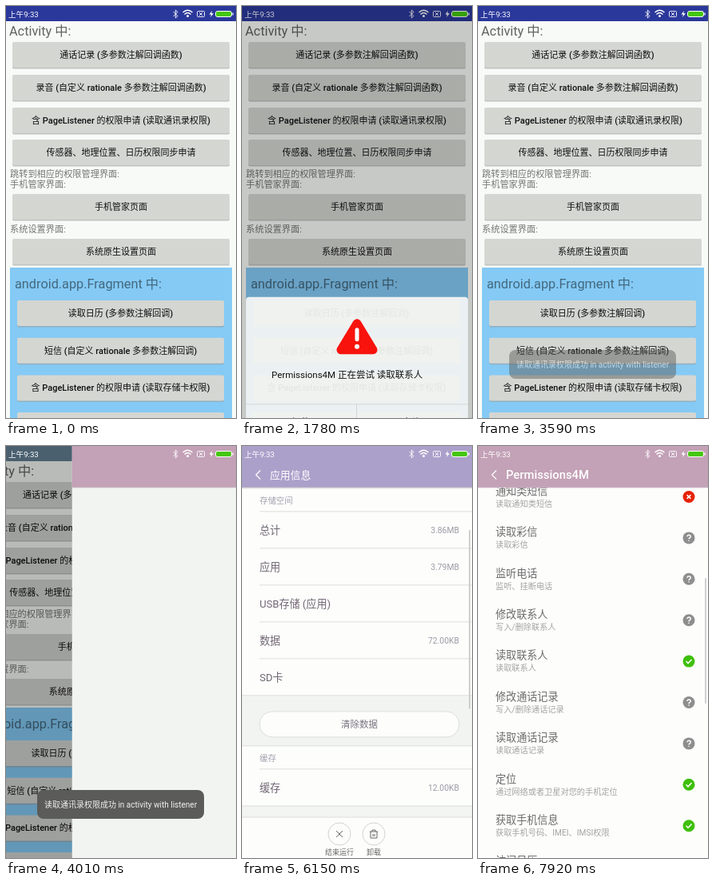
An HTML page that plays this animation: 288 by 515 pixels, repeating every 8 s.

```html
<!DOCTYPE html>
<html lang="zh-CN">
<head>
<meta charset="utf-8">
<title>权限申请演示</title>
<style>
  html, body { margin: 0; width: 100%; height: 100%; overflow: hidden; background: #f8faf7; }
  svg { display: block; width: 100vw; height: 100vh; }
  text { font-family: Roboto, "Noto Sans CJK SC", "Noto Sans CJK", sans-serif; }
</style>
</head>
<body>
<svg id="stage" viewBox="0 0 288 515"></svg>
<script>
const W = 288, H = 515, LOOP = 8000, HEADER = 52, BAR = 464;
const PINK = '#c3a1b6', LAVENDER = '#aba0ca', GRAY = '#f2f4f2', WHITE = '#fdfefc', LINE = '#dcdedc';
const stage = document.getElementById('stage');

// Moments at which the picture changes; it is held in between.
const STEPS = [0, 1240, 1360, 1510, 1630, 1780, 1930, 2080,
  2510, 2630, 2750, 2870, 3020, 3140, 3440,
  3590, 3720, 3860, 4010, 4160, 4280, 4400,
  4710, 4860, 5010, 5160, 5310, 5430, 5580, 5730,
  5880, 6030, 6150, 6300, 6420, 6570, 6690, 6840,
  6960, 7080, 7230, 7380, 7530, 7680, 7920];

const clamp = v => Math.max(0, Math.min(1, v));
const ramp = (t, start, length) => clamp((t - start) / length);
const easeOut = p => 1 - Math.pow(1 - p, 2.35);
const smooth = p => p * p * (3 - 2 * p);

function add(parent, tag, attrs) {
  const el = document.createElementNS('http://www.w3.org/2000/svg', tag);
  for (const key in attrs) el.setAttribute(key, attrs[key]);
  return parent.appendChild(el);
}
const group = parent => add(parent, 'g', {});
const rect = (parent, x, y, width, height, fill, more) =>
  add(parent, 'rect', { x, y, width, height, fill, ...more });
const path = (parent, d, stroke, width = 1, more) =>
  add(parent, 'path', { d, stroke, 'stroke-width': width, fill: 'none', ...more });
const circle = (parent, cx, cy, r, fill, more) => add(parent, 'circle', { cx, cy, r, fill, ...more });

// Places text by its vertical middle.
function label(parent, x, middle, size, fill, content, more) {
  const el = add(parent, 'text', { x, y: middle + size * 0.37, 'font-size': size, fill, ...more });
  el.textContent = content;
  return el;
}
const MIDDLE = { 'text-anchor': 'middle' }, END = { 'text-anchor': 'end' }, BOLD = { 'font-weight': 500 };
const move = (el, x, y) => el.setAttribute('transform', `translate(${x} ${y})`);
const fade = (el, opacity) => el.setAttribute('opacity', opacity);

function button(parent, x, y, width, content) {
  rect(parent, x, y + 1.5, width, 32, '#9b9e9b', { rx: 2, opacity: 0.6 });
  const face = rect(parent, x, y, width, 32, '#d4d6d2', { rx: 2 });
  label(parent, x + width / 2, y + 16, 11, '#111', content, { ...MIDDLE, ...BOLD });
  return face;
}

function header(parent, fill) {
  const bar = rect(parent, 0, 0, W, HEADER, fill);
  path(parent, `M0 ${HEADER}H${W}`, '#cfc4cc', 0.8);
  return bar;
}
function headerTitle(parent, content, size) {
  const g = group(parent);
  path(g, 'M23 30.5L17.5 36L23 41.5', '#fff', 1.2);
  label(g, 35, 36, size, '#fff', content, BOLD);
  return g;
}

// Main screen
const main = group(stage);
rect(main, 0, 0, W, H, '#f8faf7');
const mainStatus = rect(main, 0, 0, W, 19, '#2b389b');
label(main, 4, 31, 16.3, '#60635f', 'Activity 中:');
const mainButtons = [
  [45, '通话记录 (多参数注解回调函数)'],
  [86, '录音 (自定义 rationale 多参数注解回调函数)'],
  [127, '含 PageListener 的权限申请 (读取通讯录权限)'],
  [167, '传感器、地理位置、日历权限同步申请'],
  [235, '手机管家页面'],
  [291, '系统原生设置页面']
].map(([y, content]) => button(main, 8, y, 272, content));
[[210, '跳转到相应的权限管理界面:'], [223, '手机管家界面:'], [279, '系统设置界面:']]
  .forEach(([y, content]) => label(main, 5, y, 11.2, '#747672', content));
rect(main, 5, 327, 278, 188, '#84caf5');
label(main, 11, 347, 16.3, '#44687f', 'android.app.Fragment 中:');
['读取日历 (多参数注解回调)', '短信 (自定义 rationale 多参数注解回调)',
  '含 PageListener 的权限申请 (读取存储卡权限)', '传感器、日历权限同步申请']
  .forEach((content, i) => button(main, 14, 368 + i * 46.7, 259, content));
const mainShade = rect(main, 0, 0, W + 70, H, '#000');

// App details screen
const details = group(stage);
rect(details, 0, 0, W, H, GRAY);
const detailsBody = group(details);
const scroller = group(detailsBody);

function panel(top, bottom) {
  rect(scroller, 0, top, W, bottom - top, WHITE);
  path(scroller, `M0 ${top}H${W}M0 ${bottom}H${W}`, LINE);
}
function section(top, name, rows) {
  panel(top, top + 29 + rows * 46);
  label(scroller, 22, top + 15, 10.4, '#a49fae', name);
  for (let i = 0; i < rows; i++) path(scroller, `M22 ${top + 29 + i * 46}H${W}`, LINE);
}
function pill(top, content) {
  rect(scroller, 22, top, 250, 32, WHITE, { rx: 16, stroke: LINE });
  label(scroller, 147, top + 16, 11.5, '#77707d', content, MIDDLE);
}
const rowName = (middle, content, fill = '#706673') => label(scroller, 22, middle, 13.1, fill, content);
const rowNote = (middle, content) => label(scroller, 22, middle, 10.2, '#a9a9ac', content);
const rowValue = middle => label(scroller, 272, middle, 10.4, '#9c99a5', '', END);

rect(scroller, 0, HEADER, W, 48, WHITE);
rect(scroller, 23, 60, 25, 25, '#a070dc', { rx: 4 });
label(scroller, 58, 66, 14, '#706673', 'Permissions4M');
label(scroller, 58, 83, 10.2, '#a9a9ac', '版本 1.0');
panel(101, 146);
rowName(124, '自定义通知');
label(scroller, 255, 124, 10.4, '#8d8a94', '角标', END);
path(scroller, 'M266 119L271 124L266 129', '#b5b5b8');
section(153, '存储空间', 5);
['总计', '应用', 'USB存储 (应用)', '数据', 'SD卡'].forEach((name, i) => rowName(205 + i * 46, name));
const sizes = [[205, '3.86MB'], [251, '3.79MB'], [343, '72.00KB']]
  .map(([y, size]) => ({ el: rowValue(y), size }));
pill(432, '清除数据');
section(475, '缓存', 1);
rowName(527, '缓存');
rowValue(527).textContent = '12.00KB';
pill(570, '清除缓存');
section(612, '默认打开', 1);
rowName(658, '清除默认操作', '#b4b4b6');
rowNote(674, '没有默认操作。');
section(694, '权限', 2);
rowName(739, '查看权限详情');
rowNote(755, '全部权限: 安全4, 隐私12');
rowName(785, '权限管理');
rowNote(801, '自启动, 安全权限, 隐私权限');
const detailsThumb = rect(detailsBody, 284, HEADER, 2, 224, '#cfd0cf', { rx: 1 });

const actionBar = group(detailsBody);
rect(actionBar, 0, BAR, W, H - BAR, WHITE);
path(actionBar, `M0 ${BAR}H${W}`, LINE);
const actions = [
  ['结束运行', 'M-4 -4L4 4M4 -4L-4 4'],
  ['卸载', 'M-5 -3H5M-2 -3V-5H2V-3M-4 -3V5H4V-3M-1 0V3M1 0V3']
].map(([name, icon], i) => {
  const g = group(actionBar), art = group(g);
  move(art, 122 + i * 43, 485);
  circle(art, 0, 0, 14, WHITE, { stroke: '#d2d3d2' });
  path(art, icon, '#666');
  label(g, 122 + i * 43, 508, 9, '#666', name, MIDDLE);
  return g;
});
const detailsHeader = header(details, PINK);
const detailsTitle = headerTitle(details, '应用信息', 12.8);
const detailsShade = rect(details, 0, 0, W + 70, H, '#000');

// Permission list screen
const perms = group(stage);
rect(perms, 0, 0, W, H, GRAY);
const permsBody = group(perms);
rect(permsBody, 0, HEADER, W, H - HEADER, WHITE);
const list = group(permsBody);
label(list, 22, 85, 13, '#6b6b6b', '信任该应用');
label(list, 22, 101, 10.2, '#a3a3a3', '不再提示所有权限申请');
rect(list, 242, 83, 30, 16, '#e1e3e1', { rx: 8 });
circle(list, 250, 91, 7, '#fff');
rect(list, 0, 126, W, 30, GRAY);
label(list, 22, 142, 10.4, '#a3a3a3', '安全和隐私');

const MARKS = {
  ask: ['#8e8e8e', 'M-2 -1.6C-2 -4.4 2.4 -4.2 2.2 -1.5C2 0 0 0 0 1.7M0 3V4.2'],
  yes: ['#3fbf0b', 'M-3.4 0L-1 2.5L3.5 -2.2'],
  no: ['#e62306', 'M-2.4 -2.4L2.4 2.4M2.4 -2.4L-2.4 2.4']
};
[['发送短信', '发送短信', 'ask'], ['发送彩信', '发送彩信', 'ask'],
  ['拨打电话', '直接拨打电话', 'ask'], ['读取短信', '读取短信', 'ask'],
  ['通知类短信', '读取通知类短信', 'no'], ['读取彩信', '读取彩信', 'ask'],
  ['监听电话', '监听、挂断电话', 'ask'], ['修改联系人', '写入/删除联系人', 'ask'],
  ['读取联系人', '读取联系人', 'yes'], ['修改通话记录', '写入/删除通话记录', 'ask'],
  ['读取通话记录', '读取通话记录', 'ask'], ['定位', '通过网络或者卫星对您的手机定位', 'yes'],
  ['获取手机信息', '获取手机号码、IMEI、IMSI权限', 'yes'], ['访问日历', '读取日历', 'ask']
].forEach(([name, note, mark], i) => {
  const y = 183.4 + i * 51.4, [fill, icon] = MARKS[mark], badge = group(list);
  label(list, 22, y, 13.1, '#6b6b6b', name);
  label(list, 22, y + 16, 10.2, '#a3a3a3', note);
  move(badge, 264, y + 7.5);
  circle(badge, 0, 0, 7.5, fill);
  path(badge, icon, '#fff', 1.5);
});
const permsThumb = rect(permsBody, 284, HEADER, 2, 157, '#cfd0cf', { rx: 1 });
header(perms, PINK);
const waitTitle = headerTitle(perms, '安全中心', 12.8);
const permsTitle = headerTitle(perms, 'Permissions4M', 14.8);

// Status icons
const status = group(stage);
label(status, 3, 10, 9.6, '#fff', '上午9:33');
path(status, 'M209.5 7L215 12.5L212.3 15V5L215 7.5L209.5 13', '#fff', 0.9);
path(status, 'M221.5 8Q227.5 2.5 233.5 8M223.5 10.5Q227.5 6.5 231.5 10.5', '#fff', 1.3);
circle(status, 227.5, 12.5, 1.5, '#fff');
rect(status, 239.5, 6.5, 9, 7, 'none', { stroke: '#fff', 'stroke-width': 0.9, rx: 1 });
path(status, 'M242 8L246 12M246 8L242 12', '#fff', 0.9);
add(status, 'path', { d: 'M258 6L254.5 10.5H257L256 14L260 9.3H257.3Z', fill: '#fff' });
rect(status, 262.5, 6.5, 20, 7, '#45c60c', { rx: 2.5, stroke: '#fff' });
rect(status, 283.5, 8.5, 1.2, 3, '#fff');

// Permission dialog
const dialogShade = rect(stage, 0, 0, W, H, '#000');
const dialog = group(stage);
rect(dialog, 5, 0, 278, 190, '#f6f8f6', { rx: 4, opacity: 0.93 });
const allowPress = rect(dialog, 143, 134, 140, 46, '#d8dad8');
path(dialog, 'M144 33L164 66H124Z', '#f8130d', 11, { fill: '#f8130d', 'stroke-linejoin': 'round' });
path(dialog, 'M144 41V53', '#fff', 5, { 'stroke-linecap': 'round' });
circle(dialog, 144, 62, 3, '#fff');
label(dialog, 37, 97, 11.5, '#111', 'Permissions4M 正在尝试 读取联系人');
path(dialog, 'M5 134H283M143.5 134V180', '#d3d5d3');
label(dialog, 74, 157, 12, '#444', '拒绝', MIDDLE);
label(dialog, 213, 157, 12, '#444', '允许', MIDDLE);

// Toast
const toast = group(stage);
rect(toast, 39, 430, 209, 36, '#5b5b59', { rx: 8 });
label(toast, 143.5, 448, 10, '#f1f1f0', '读取通讯录权限成功 in activity with listener', MIDDLE);

const SHEET = 180, SHIFT = 65, SHADE = 0.36;

function slide(page, under, shade, p) {
  move(page, W * (1 - p), 0);
  move(under, -SHIFT * p, 0);
  fade(shade, SHADE * p);
}

function render(t) {
  const inMain = t >= 1240 && t < 1630;
  mainButtons[2].setAttribute('fill', inMain ? '#bfc1be' : '#d4d6d2');

  const rise = easeOut(ramp(t, 1596, 340)) - easeOut(ramp(t, 2800, 290));
  move(dialog, 0, H - SHEET * rise);
  fade(dialog, rise > 0.001 ? 1 : 0);
  fade(dialogShade, SHADE * (ramp(t, 1596, 340) - ramp(t, 2830, 310)));
  fade(allowPress, t >= 2510 && t < 2870 ? 0.9 : 0);
  fade(toast, ramp(t, 3350, 500) - ramp(t, 5040, 320));

  const first = easeOut(ramp(t, 3870, 340));
  const second = easeOut(ramp(t, 6900, 340));
  mainStatus.setAttribute('fill', first > 0 ? '#638095' : '#2b389b');
  slide(details, main, mainShade, first);
  slide(perms, details, detailsShade, second);
  if (second === 0) move(details, W * (1 - first), 0);

  const shown = ramp(t, 4600, 400);
  fade(detailsBody, shown);
  fade(detailsTitle, shown);
  detailsHeader.setAttribute('fill', second > 0 ? '#a9b3b0' : t >= 4710 ? LAVENDER : PINK);
  actions.forEach((g, i) => move(g, 0, 50 * (1 - easeOut(ramp(t, 4900 + i * 200, 260)))));
  sizes.forEach(({ el, size }) => { el.textContent = t < 5430 ? '正在计算...' : size; });
  const down = smooth(ramp(t, 5780, 1060));
  move(scroller, 0, -357 * down);
  move(detailsThumb, 0, 188 * down);
  fade(detailsThumb, t < 5730 || t >= 5880 && t < 6960 ? 1 : 0);

  const ready = t >= 7230;
  fade(permsBody, ready ? 1 : 0);
  fade(permsTitle, ready ? 1 : 0);
  fade(waitTitle, ready ? 0 : 1);
  const scrolled = smooth(ramp(t, 7300, 620));
  move(list, 0, -333 * scrolled);
  move(permsThumb, 0, 113 * scrolled);
}

const start = performance.now();
let shownStep = -1;
function frame() {
  const t = (performance.now() - start) % LOOP;
  let step = STEPS.length - 1;
  while (STEPS[step] > t) step--;
  if (step !== shownStep) render(STEPS[shownStep = step]);
  requestAnimationFrame(frame);
}
frame();
</script>
</body>
</html>
```
